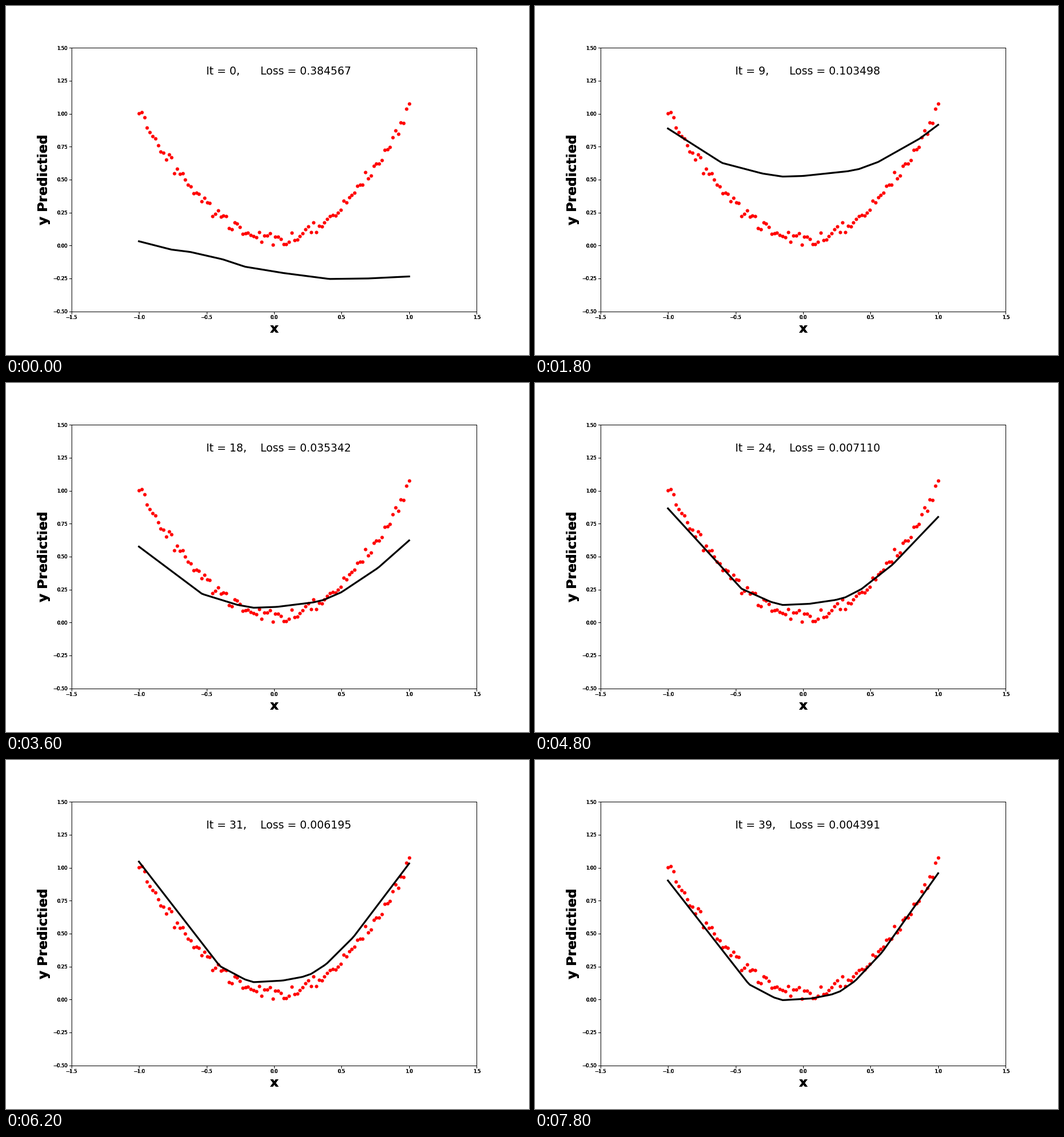
Recreate the animation shown at these times as a matplotlib script. Size 917 by 611 pixels, loop 8 s.

```python
import numpy as np
import matplotlib.pyplot as plt
from matplotlib.animation import FuncAnimation

W, H, DPI = 917, 611, 64
STEPS, INTERVAL = 40, 200
RECT = [0.125, 0.125, 0.775, 0.755]


def u(points):
    """Scale a size given for a 12 inch, 72 dpi figure to this one."""
    return points * W / (12 * 72) * 72 / DPI


plt.rcParams.update({
    "font.family": "DejaVu Sans",
    "axes.linewidth": u(0.8),
    "axes.labelsize": u(22),
    "axes.labelweight": "bold",
    "axes.labelpad": u(4),
})
for axis in ("xtick", "ytick"):
    plt.rcParams.update({
        axis + ".labelsize": u(8),
        axis + ".major.size": u(3.5),
        axis + ".major.pad": u(2.7),
        axis + ".major.width": u(0.8),
    })

rng = np.random.RandomState(9)
x = np.linspace(-1, 1, 100)
y = x ** 2 + 0.1 * rng.rand(x.size)

# Iteration, height at the left end, at the floor and at the right end, loss
KEYS = np.array([
    [0, 0.032, -0.172, -0.235, 0.384567],
    [9, 0.888, 0.523, 0.916, 0.103498],
    [18, 0.576, 0.112, 0.623, 0.035342],
    [24, 0.866, 0.133, 0.801, 0.007110],
    [28, 1.059, 0.167, 0.990, 0.009399],
    [34, 0.970, 0.067, 1.010, 0.001365],
    [36, 0.928, 0.022, 0.972, 0.002800],
    [39, 0.903, -0.005, 0.958, 0.004391],
])
times, heights, losses = KEYS[:, 0], KEYS[:, 1:4], KEYS[:, 4]
speeds = np.gradient(heights, times, axis=0)

# Each side of the fit is a sum of hinges: early place, late place, weight
LEFT = np.array([[-0.15, -0.15, 0.31], [-0.30, -0.215, 0.23], [-0.60, -0.40, 0.77]])
RIGHT = np.array([
    [-0.15, -0.15, 0.06], [0.0, 0.065, 0.14], [0.33, 0.21, 0.17],
    [0.414, 0.275, 0.33], [0.557, 0.385, 0.37], [0.865, 0.585, 0.35],
])

# The untrained fit
start = np.interp(x, [-1, -0.76, -0.62, -0.38, -0.215, 0.07, 0.41, 0.7, 1],
                  [0.032, -0.031, -0.049, -0.105, -0.161, -0.209, -0.254, -0.25, -0.235])


def smooth(s):
    s = np.clip(s, 0, 1)
    return s * s * (3 - 2 * s)


def glide(it):
    """Hermite motion of the three heights through their keys."""
    k = min(np.searchsorted(times, it, side="right") - 1, len(times) - 2)
    span = times[k + 1] - times[k]
    s = (it - times[k]) / span
    return ((1 - smooth(s)) * heights[k] + smooth(s) * heights[k + 1]
            + s * (1 - s) * span * ((1 - s) * speeds[k] - s * speeds[k + 1]))


def rise(hinges, side, late):
    """Hinge sum that grows from 0 at the floor to 1 at the end x = side."""
    early, final, weight = hinges.T
    bends = early + (final - early) * late
    total = np.maximum(side * (x[:, None] - bends), 0) @ weight
    return total / total.max()


def shape(it):
    left, floor, right = glide(it)
    late = smooth((it - 9) / 23)
    return (floor + (left - floor) * rise(LEFT, -1, late)
            + (right - floor) * rise(RIGHT, 1, late))


def predict(it):
    return shape(it) + max(0, 1 - it / 9) * (start - shape(0))


def mse(it):
    return np.mean((predict(it) - y) ** 2)


gain = losses / [mse(t) for t in times]


def loss(it):
    return mse(it) * np.interp(it, times, gain)


fig = plt.figure(figsize=(W / DPI, H / DPI), dpi=DPI, facecolor="white")

# Stacked copies give the labels their heavy, repeatedly drawn look
for _ in range(5):
    ax = fig.add_axes(RECT, facecolor="none")
    ax.set(xlim=(-1.5, 1.5), ylim=(-0.5, 1.5), xlabel="x", ylabel="y Predictied",
           xticks=np.arange(-1.5, 1.6, 0.5), yticks=np.arange(-0.5, 1.6, 0.25))

ax.scatter(x, y, s=u(5.8) ** 2, color="red", linewidths=0)
line, = ax.plot(x, predict(0), "k-", lw=u(3))
step_text = ax.text(-0.502, 1.296, "", size=u(17.75))
loss_text = ax.text(-0.102, 1.296, "", size=u(17.75))


def update(it):
    line.set_ydata(predict(it))
    step_text.set_text(f"It = {it},")
    loss_text.set_text(f"Loss = {loss(it):.6f}")
    return line, step_text, loss_text


anim = FuncAnimation(fig, update, frames=STEPS, interval=INTERVAL, repeat=True)
plt.show()
```
